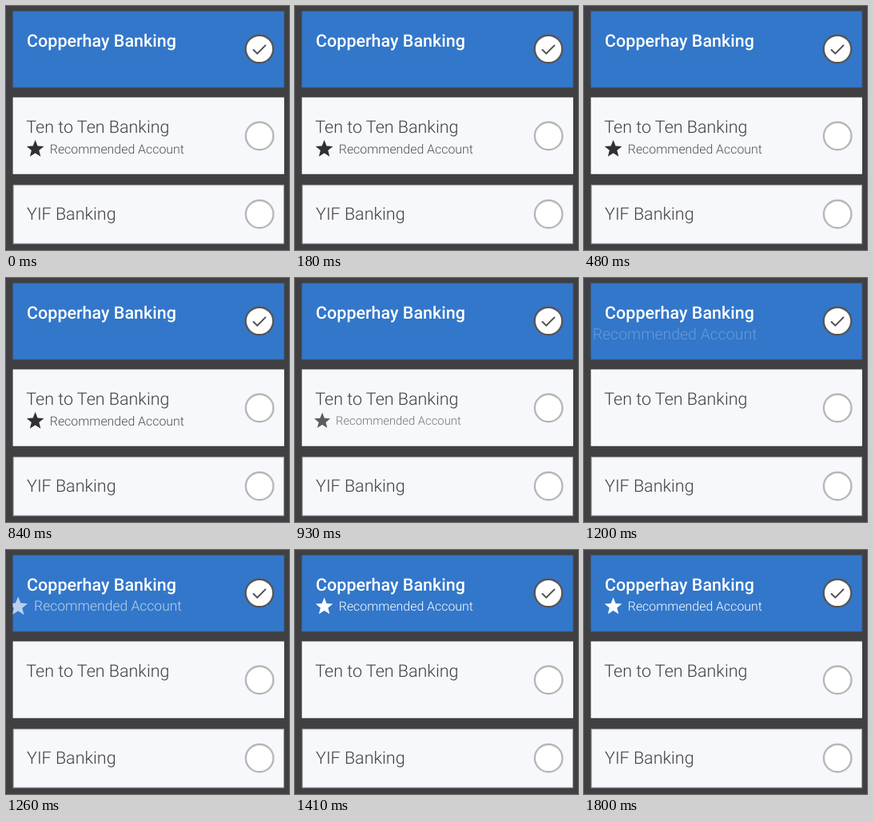
Write an HTML page that moves like this. It is 354 by 306 pixels and loops after 3.12 s.

```html
<!DOCTYPE html>
<html lang="en">
<head>
<meta charset="utf-8">
<title>Account picker</title>
<style>
  html, body { margin: 0; width: 100%; height: 100%; overflow: hidden; background: #404042; }
  svg { display: block; width: 100%; height: 100%; font: 300 21.5px Roboto, sans-serif; text-rendering: geometricPrecision; }
  .card { fill: #f6f8fb; }
  .name { fill: #404042; }
  .note { font-size: 15.9px; }
  .radio { fill: #fff; stroke: #b7b7b8; stroke-width: 2.4; }
</style>
</head>
<body>
<svg viewBox="0 0 354 306">
  <defs>
    <path id="star" d=""/>
    <clipPath id="blueCard"><rect x="8.5" y="6.5" width="339.5" height="95.5"/></clipPath>
  </defs>
  <rect width="354" height="306" fill="#404042"/>
  <rect x="8.8" y="6.8" width="339" height="95.2" fill="#3277ca" stroke="#3a67a0" stroke-width=".8"/>
  <rect class="card" x="8.6" y="114.6" width="339.4" height="96.2"/>
  <rect class="card" x="9.2" y="224.7" width="338.4" height="73.3" stroke="#a3a3a3"/>

  <text x="26" y="51" fill="#fff" font-weight="500">Copperhay Banking</text>
  <text class="name" x="25.3" y="159.3">Ten to Ten Banking</text>
  <text class="name" x="26" y="267.7">YIF Banking</text>

  <circle class="radio" cx="317" cy="54" r="17.3" style="stroke:#565658"/>
  <path d="M309 54.5 l5.3 5.2 l10.7 -10.8" fill="none" stroke="#505052" stroke-width="2"/>
  <circle class="radio" cx="317.2" cy="163" r="17.3"/>
  <circle class="radio" cx="317.2" cy="261" r="17.3"/>

  <g id="leaving" fill="#303033">
    <use href="#star" x="36.6" y="179.5"/>
    <text class="note" x="54.8" y="184.6" fill="#505053">Recommended Account</text>
  </g>
  <g clip-path="url(#blueCard)">
    <g id="arriving" fill="#fff">
      <use href="#star" x="36.6" y="71"/>
      <text class="note" x="54.8" y="76">Recommended Account</text>
    </g>
  </g>
</svg>
<script>
  const LOOP = 3120;
  const leaving = document.getElementById('leaving');
  const arriving = document.getElementById('arriving');

  const points = Array.from({ length: 10 }, (_, i) => {
    const radius = i % 2 ? 5 : 11.4, angle = (i / 5 - 0.5) * Math.PI;
    return `${radius * Math.cos(angle)} ${radius * Math.sin(angle)}`;
  });
  document.getElementById('star').setAttribute('d', `M${points.join('L')}Z`);

  function progress(time, start, duration) {
    const t = Math.min(1, Math.max(0, (time - start) / duration));
    return t < 0.5 ? 2 * t * t : 1 - 2 * (1 - t) ** 2;
  }

  function pose(group, originX, originY, scale, opacity) {
    group.setAttribute('transform',
      `translate(${originX} ${originY}) scale(${scale}) translate(${-originX} ${-originY})`);
    group.setAttribute('opacity', opacity);
  }

  const begin = performance.now();
  function draw() {
    const time = (performance.now() - begin) % LOOP;
    const out = progress(time, 850, 240);
    const into = progress(time, 1110, 255);
    pose(leaving, 0, 179, 1 - 0.3 * out, 1 - out);
    pose(arriving, 252, 71, 1.3 - 0.3 * into, into);
    requestAnimationFrame(draw);
  }
  draw();
</script>
</body>
</html>
```
